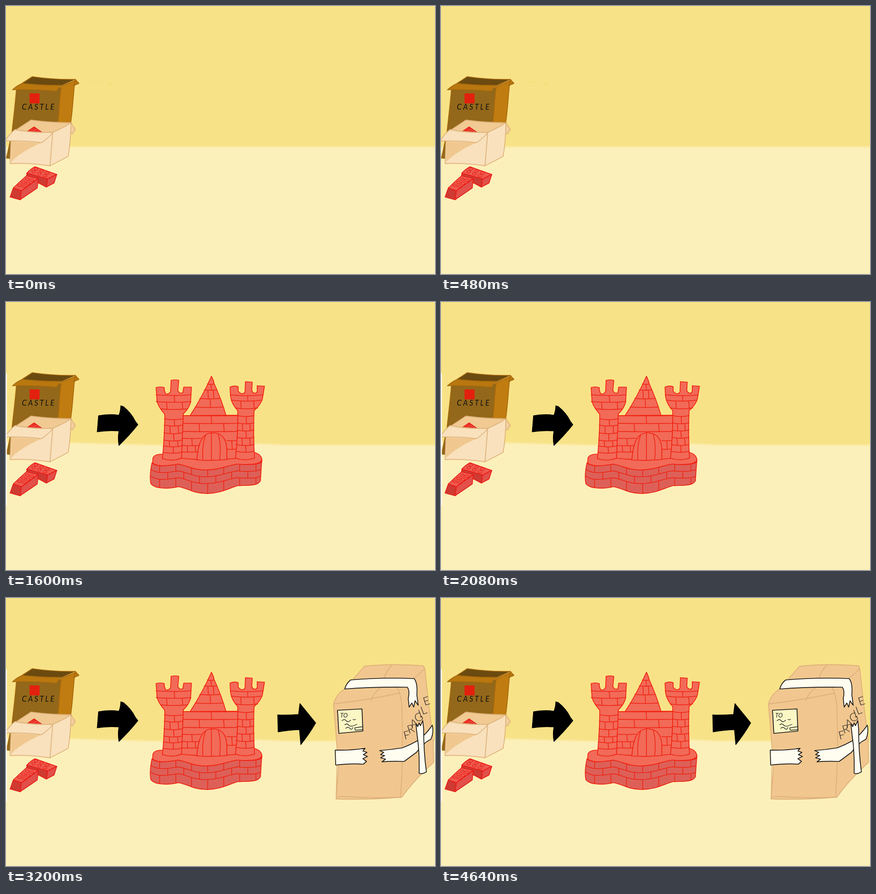
Animation, 946 px wide and 592 px high, one loop 5600 ms. Source, as an HTML page:

```html
<!DOCTYPE html>
<html lang="en">
<head>
<meta charset="utf-8">
<title>From bricks to parcel</title>
<style>
  html, body { margin: 0; width: 100%; height: 100%; overflow: hidden; background: #f8e287; }
  svg { display: block; width: 100%; height: 100%; }
  path { stroke-linejoin: round; stroke-linecap: round; }
  text { font-family: Lato, "Open Sans", sans-serif; }
  .floor { fill: #fcf0ba; filter: url(#soft); }
  .arrow { stroke: #000; stroke-width: 1.2; }
  .carton path { stroke: #a5680d; stroke-width: 1.6; }
  .bin path { stroke: #dfb37c; stroke-width: 1.8; }
  .bricks path, .bricks ellipse { stroke: #ea1a12; stroke-width: 1.6; }
  .bricks ellipse { fill: none; stroke-width: 1.1; }
  .castle path { stroke: #f0200f; stroke-width: 1.7; fill: #f26a58; }
  .castle .line { fill: none; stroke-width: 1.5; }
  .parcel path { stroke: #dfb07a; stroke-width: 1.8; fill: #f1c78f; }
  .parcel .line { fill: none; }
  .parcel .tape { fill: #fffdf0; stroke: #111; stroke-width: 1.7; }
  .parcel .pen { fill: none; stroke: #222; stroke-width: 1.3; }
</style>
</head>
<body>
<svg viewBox="0 0 946 592" preserveAspectRatio="none">
  <defs>
    <filter id="soft" x="-5%" y="-5%" width="110%" height="110%"><feGaussianBlur stdDeviation="2"/></filter>
    <clipPath id="inBase"><use href="#base"/></clipPath>
  </defs>
  <rect width="946" height="592" fill="#f8e287"/>
  <g data-from="0" data-to="800">
    <path class="floor" d="M-20 311H966V620H-20Z"/>
    <path d="M187 169Q199 165 209 169M224 169Q236 168 234 172Q229 174 225 172" fill="none" stroke="#f5da72" stroke-width="1"/>
  </g>
  <g data-from="800" data-to="1600">
    <path class="floor" d="M-20 303L70 308L150 311Q220 316 300 317H966V620H-20Z"/>
  </g>
  <g data-from="1600" data-to="5600">
    <path class="floor" d="M-20 308L150 311Q250 314 330 316L560 313L620 316H966V620H-20Z"/>
  </g>

  <g class="carton">
    <path fill="#94681a" d="M23 183C20 220 16 250 13 280L1 336L12 337H110L116 255L123 180Z"/>
    <path fill="#c07c10" d="M122 178L152 165C148 200 147 235 142 262L114 258C118 235 117 205 122 178Z"/>
    <path fill="#6b4a10" d="M58 156Q105 163 153 162L122 176Q75 175 35 171Q46 164 58 156Z"/>
    <path fill="#b9770f" d="M14 185Q28 173 36 171Q80 176 122 175L111 188Q60 184 14 185Z"/>
    <path fill="#b9770f" d="M153 162L161 171L149 176Q152 170 153 162Z"/>
    <rect x="52" y="193" width="22" height="22" fill="#e3200f"/>
    <text x="35" y="229" font-size="16.5" font-style="italic" letter-spacing="3.4" fill="#111">CASTLE</text>
  </g>

  <g class="bin">
    <path fill="#f3cf9c" d="M143 258L153 273L146 283L139 275Z"/>
    <path fill="#f0ca92" d="M20 275Q40 262 55 252Q100 258 145 258L103 282Z"/>
    <g class="bricks">
      <path fill="#ea4f45" d="M46 278L62 267L79 279Z"/>
      <ellipse cx="62" cy="272" rx="3" ry="1.6"/><ellipse cx="56" cy="276" rx="3" ry="1.6"/><ellipse cx="67" cy="277" rx="3" ry="1.6"/>
    </g>
    <path fill="#f9e1bd" d="M11 297L103 279Q101 320 97 353Q50 346 9 348Z"/>
    <path fill="#f0c88f" style="stroke:none" d="M12 299L78 302C50 314 24 330 11 345Z"/>
    <path fill="#f9e1bd" d="M103 279Q125 270 143 258Q143 300 137 332Q119 342 97 353Z"/>
    <path fill="#f9e1bd" d="M-2 298Q8 282 20 273Q60 281 104 279Q92 293 78 302Q40 297 -2 298Z"/>
  </g>

  <g class="bricks">
    <path fill="#cf3a33" d="M46 369L92 382L89 400L68 389L45 379Z"/>
    <path fill="#e2504a" d="M92 382L112 372L106 391L89 400Z"/>
    <path fill="#ee5a4e" d="M46 369Q54 360 64 355L112 372L92 382Z"/>
    <path fill="#cf3a33" d="M16 402L34 408L31 428L9 422Z"/>
    <path fill="#e2504a" d="M34 408L71 381L69 402L31 428Z"/>
    <path fill="#ee5a4e" d="M16 402Q30 388 45 375L71 381L34 408Z"/>
    <g id="studs"></g>
  </g>

  <g data-from="800" data-to="5600">
    <path class="arrow" d="M204 251Q230 247 249 250Q253 240 253 229L259 231Q277 246 285 263L291 271Q272 295 249 317Q246 300 249 285Q225 283 201 287Z"/>
  </g>

  <g class="castle" data-from="1600" data-to="5600">
    <path d="M324 345C326 336 340 336 346 336L547 332C560 335 566 344 564 353L556 372H322Z"/>
    <path id="base" style="fill:#dd6058" d="M322 355C335 366 360 361 380 358C402 362 412 371 440 371C470 371 488 361 510 358C535 360 558 360 564 350L561 395C555 408 530 404 510 406C490 412 470 424 440 423C410 422 400 411 380 408C355 414 325 412 319 400C317 385 319 368 322 355Z"/>
    <path d="M386 251L512 250L510 345Q450 352 386 345Z"/>
    <path d="M406 251Q433 209 453 164Q458 174 459 180Q475 215 485 250Z"/>
    <path d="M331 189Q340 186 349 189Q349 199 353 203Q360 204 363 197L364 173Q373 171 381 173L379 196Q384 204 390 200L392 188H409L407 222Q403 236 391 247L387 345Q365 353 345 346Q350 290 350 248Q337 233 333 220Z"/>
    <path d="M494 188Q503 184 512 187V197Q521 207 527 199L528 176L543 177L542 196Q548 206 554 198V185L570 186L565 216Q559 230 547 240Q545 290 548 345Q527 352 506 345Q512 290 511 240Q497 225 495 208Z"/>
    <path d="M421 349C423 312 433 289 455 289C478 289 486 304 487 325V348Q455 351 421 349Z"/>
    <path class="line" d="M434 348Q432 318 440 294M453 349V289M471 348Q475 315 468 293"/>
    <path class="line" id="joints"/>
    <path class="line" id="baseJoints" clip-path="url(#inBase)"/>
  </g>

  <g data-from="2400" data-to="5600">
    <path class="arrow" d="M599 258Q622 259 645 257L648 233L683 276Q668 302 650 324L647 291Q622 292 600 296Z"/>
  </g>

  <g class="parcel" data-from="3200" data-to="5600">
    <path d="M790 151Q850 144 921 150L924 160Q932 240 942 310L943 363Q900 402 873 440Q800 446 728 444L733 375Q728 300 722 235Q727 213 748 200Q768 176 790 151Z"/>
    <path class="line" d="M722 234Q800 225 868 210M862 196Q874 220 873 250Q877 345 870 440M864 198Q905 178 924 155M852 148Q838 160 834 178M828 197Q809 210 805 227M729 441L738 438Q805 443 872 440M730 366L728 444"/>
    <path class="tape" d="M760 181Q830 175 900 178Q908 188 906 214L909 237L902 227L899 241L895 232L889 241L887 222Q891 205 885 197Q810 196 747 201Q750 189 760 181Z"/>
    <path class="tape" d="M726 336Q760 337 792 332L787 338L796 341L788 346L797 350L787 355L795 361L788 367Q760 365 727 369Z"/>
    <path class="tape" d="M824 337Q850 335 874 331Q890 325 906 316Q926 302 940 281Q944 295 937 312Q920 320 905 341L878 361Q850 360 829 362L837 356L826 353L835 348L826 346L833 341Z"/>
    <path class="tape" d="M904 279L908 284L911 276L914 282L919 271L921 290Q921 340 927 384Q918 390 911 387Q912 340 907 307Z"/>
    <path class="tape" style="fill:#fbf7c4" d="M731 248L785 245L787 294L734 299Z"/>
    <path class="pen" d="M741 271Q746 266 750 271T760 270M765 268Q768 270 771 268M747 280Q752 276 756 281T774 279M749 288Q754 283 758 288T765 286M769 287L787 284M769 287L770 292L787 291"/>
    <text x="737" y="264" font-size="13" font-style="italic" fill="#222">TO</text>
    <text font-size="25" font-weight="300" fill="#222" x="879 888 895 905 913 918 923" y="313 300 288 275 265 258 238" rotate="-14 -18 -22 -24 -20 -20 -18">FRAGILE</text>
  </g>

  <rect x="0" y="158" width="2" height="291" fill="#fff" data-from="1600" data-to="5600"/>
</svg>
<script>
const LOOP = 5600;
const $ = id => document.getElementById(id);

// Studs sit on a slanted grid: origin, step along, step across.
function studs(x, y, [ax, ay], [bx, by], n) {
  let out = '';
  for (let i = 0; i < n; i++)
    for (let j = 0; j < 2; j++)
      out += `<ellipse cx="${x + ax * i + bx * j}" cy="${y + ay * i + by * j}" rx="4" ry="2.7"/>`;
  return out;
}
$('studs').innerHTML =
  studs(66, 360, [12.5, 4.5], [-5, 6], 3) + studs(30, 396, [8.5, -6.5], [10, 2], 3);

// Courses of bricks; left and right give the edges at each height.
function courses(ys, left, right, sag = 2) {
  let d = '';
  ys.forEach((y, i) => {
    const a = left(y), b = right(y), next = ys[i + 1];
    d += `M${a} ${y}Q${(a + b) / 2} ${y + sag * 2} ${b} ${y}`;
    if (!next) return;
    for (const k of i % 2 ? [.3, .75] : [.52]) {
      const x = a + (b - a) * k, dip = sag * 4 * k * (1 - k);
      d += `M${x} ${y + dip}L${x + 1} ${next + dip}`;
    }
  });
  return d;
}
const at = x => () => x;

$('joints').setAttribute('d', [
  courses([205, 220, 236], y => 331 + Math.max(0, y - 220) * .6, y => 408 - Math.max(0, y - 220) * .5, 1.5),
  courses([258, 272, 289, 305, 318, 332], y => 350 - (y - 246) * .04, y => 391 - (y - 246) * .04),
  courses([205, 217, 234], y => 495 + Math.max(0, y - 208) * .4, y => 567 - Math.max(0, y - 205) * .4),
  courses([251, 267, 283, 299, 315, 330], y => 511 - (y - 241) * .04, at(547)),
  courses([181, 194, 213, 232], y => 453 - (y - 164) * .53, y => 453 + (y - 164) * .37, 1),
  courses([251, 268, 286], at(390), at(510), .5),
  courses([301, 317, 331], at(388), y => 430 - (y - 301) * .2, .5),
  courses([306, 325], at(487), at(508), .5)
].join(''));

// The base repeats its wavy rim; joints hang from points along it.
const rim = document.createElementNS('http://www.w3.org/2000/svg', 'path');
rim.setAttribute('d', 'M320 355C335 366 360 361 380 358C402 362 412 371 440 371C470 371 488 361 510 358C535 360 558 360 566 352');
const rimPoint = s => rim.getPointAtLength(s);
let base = '';
for (let row = 0; row < 3; row++) {
  const dy = row * 15;
  for (let s = 0; s <= 255; s += 5) {
    const p = rimPoint(s);
    base += `${s ? 'L' : 'M'}${p.x} ${p.y + dy}`;
  }
  for (let s = 20 + (row % 2) * 18; s < 250; s += 36) {
    const p = rimPoint(s);
    base += `M${p.x} ${p.y + dy}v${row < 2 ? 15 : 26}`;
  }
}
$('baseJoints').setAttribute('d', base);

// Each part is cut in and out at its own time.
for (const el of document.querySelectorAll('[data-from]')) {
  const from = el.dataset.from / LOOP, to = el.dataset.to / LOOP;
  const key = (opacity, offset) => ({ opacity, offset, easing: 'steps(1, end)' });
  const steps = [];
  if (from > 0) steps.push(key(0, 0));
  steps.push(key(1, from));
  if (to < 1) steps.push(key(0, to));
  steps.push(key(to < 1 ? 0 : 1, 1));
  el.animate(steps, { duration: LOOP, iterations: Infinity });
}
</script>
</body>
</html>
```
